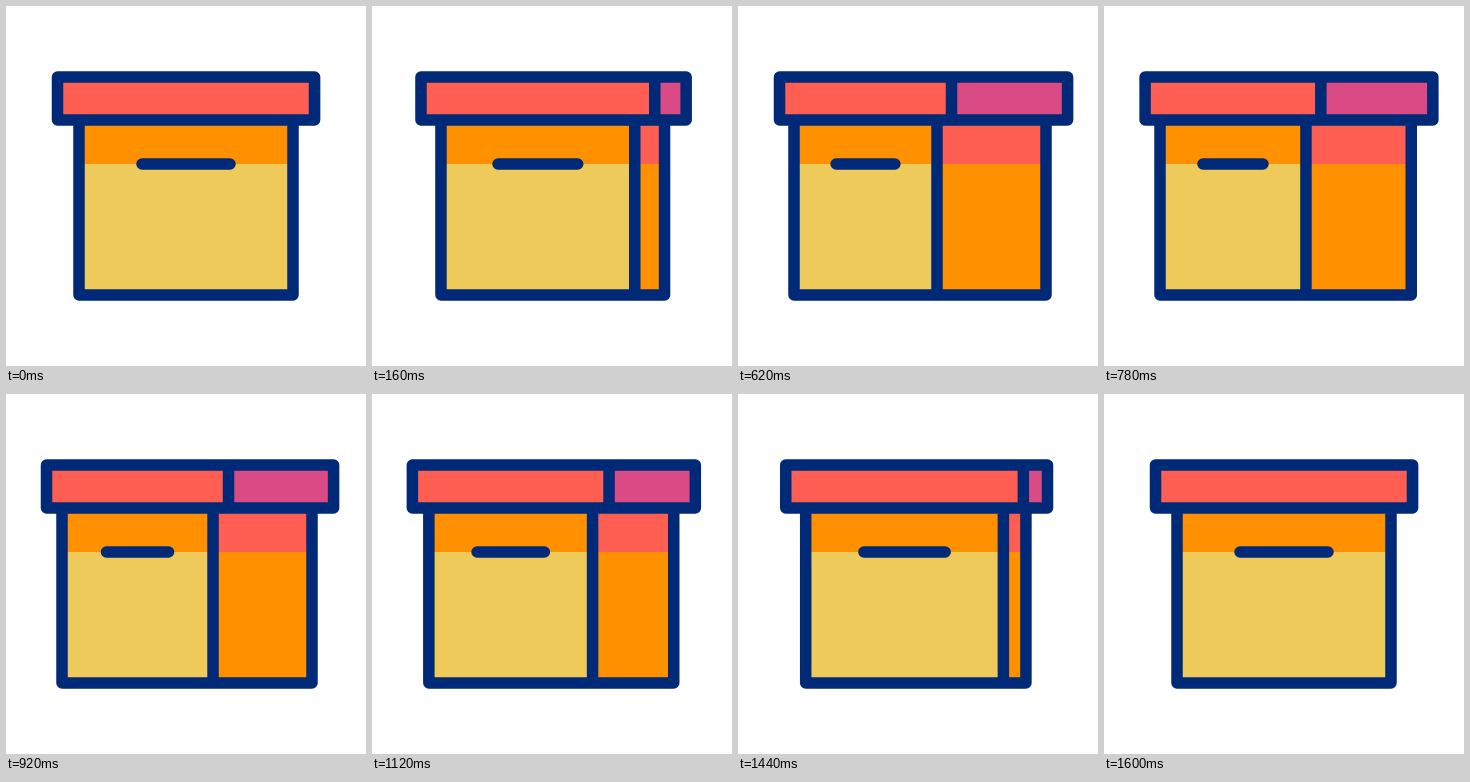
An HTML page for the animation above (2400 ms loop, 360 px wide and 360 px high).

```html
<!DOCTYPE html>
<html lang="en">
<head>
<meta charset="utf-8">
<title>Turning box</title>
<style>
  html, body { margin: 0; width: 100%; height: 100%; overflow: hidden; background: #fff; }
  svg { display: block; width: 100vw; height: 100vh; }
  #lines { fill: none; stroke: #002a77; stroke-width: 11.5; stroke-linecap: round; stroke-linejoin: round; }
</style>
</head>
<body>
<svg viewBox="0 0 360 360">
  <path id="front" fill="#eeca5b"/>
  <path id="frontTop" fill="#ff9000"/>
  <path id="side" fill="#ff9000"/>
  <path id="sideTop" fill="#ff5f53"/>
  <path id="lid" fill="#ff5f53"/>
  <path id="lidSide" fill="#da4b85"/>
  <path id="lines"/>
</svg>
<script>
const LOOP = 2400;
const TOP = 71, RIM = 114, BAND = 158, BASE = 289;

// time, body left, front/side edge, body right, lid overhang
const poses = [
  [0, 73, 287, 287, 21.5],
  [160, 69, 263, 292.5, 20],
  [270, 60.4, 221.9, 302.5, 16.3],
  [380, 57.5, 204, 307, 15],
  [620, 56, 199, 308, 14.5],
  [920, 56, 207, 306, 15.5],
  [1080, 56.4, 217, 303.5, 16.2],
  [1300, 62, 241.5, 290, 18.2],
  [1480, 69.2, 271.6, 287.6, 20.4],
  [1600, 73, 287, 287, 21.5]
];

const rate = (i, k) => (poses[i + 1][k] - poses[i][k]) / (poses[i + 1][0] - poses[i][0]);

// Harmonic mean of neighbouring rates: smooth, without overshoot.
function slope(i, k) {
  if (i === 0 || i === poses.length - 1) return 0;
  const a = rate(i - 1, k), b = rate(i, k);
  return a * b > 0 ? 2 * a * b / (a + b) : 0;
}

function valueAt(t, k) {
  let i = 0;
  while (i < poses.length - 2 && t > poses[i + 1][0]) i++;
  const [p, q] = [poses[i], poses[i + 1]];
  const span = q[0] - p[0];
  const u = Math.min(1, (t - p[0]) / span);
  const v = 1 - u;
  return p[k] * v * v * (1 + 2 * u) + q[k] * u * u * (1 + 2 * v)
    + span * u * v * (slope(i, k) * v - slope(i + 1, k) * u);
}

const setPath = (id, d) => document.getElementById(id).setAttribute('d', d);
const rect = (x0, y0, x1, y1) => `M${x0} ${y0}H${x1}V${y1}H${x0}Z`;

function draw(now) {
  const t = now % LOOP;
  const [left, edge, right, hang] = [1, 2, 3, 4].map(k => valueAt(t, k));
  const lidLeft = left - hang, lidEdge = edge + hang, lidRight = right + 21.6;
  const mid = (left + edge) / 2, grip = (edge - left) * 0.2056;

  setPath('front', rect(left, BAND, edge, BASE));
  setPath('frontTop', rect(left, RIM, edge, BAND));
  setPath('side', rect(edge, BAND, right, BASE));
  setPath('sideTop', rect(edge, RIM, right, BAND));
  setPath('lid', rect(lidLeft, TOP, lidEdge, RIM));
  setPath('lidSide', rect(lidEdge, TOP, lidRight, RIM));
  setPath('lines',
    rect(left, RIM, right, BASE) + `M${edge} ${RIM}V${BASE}` +
    rect(lidLeft, TOP, lidRight, RIM) + `M${lidEdge} ${TOP}V${RIM}` +
    `M${mid - grip} ${BAND}H${mid + grip}`);
}

function tick() {
  draw(performance.now());
  requestAnimationFrame(tick);
}
draw(0);
requestAnimationFrame(tick);
</script>
</body>
</html>
```
